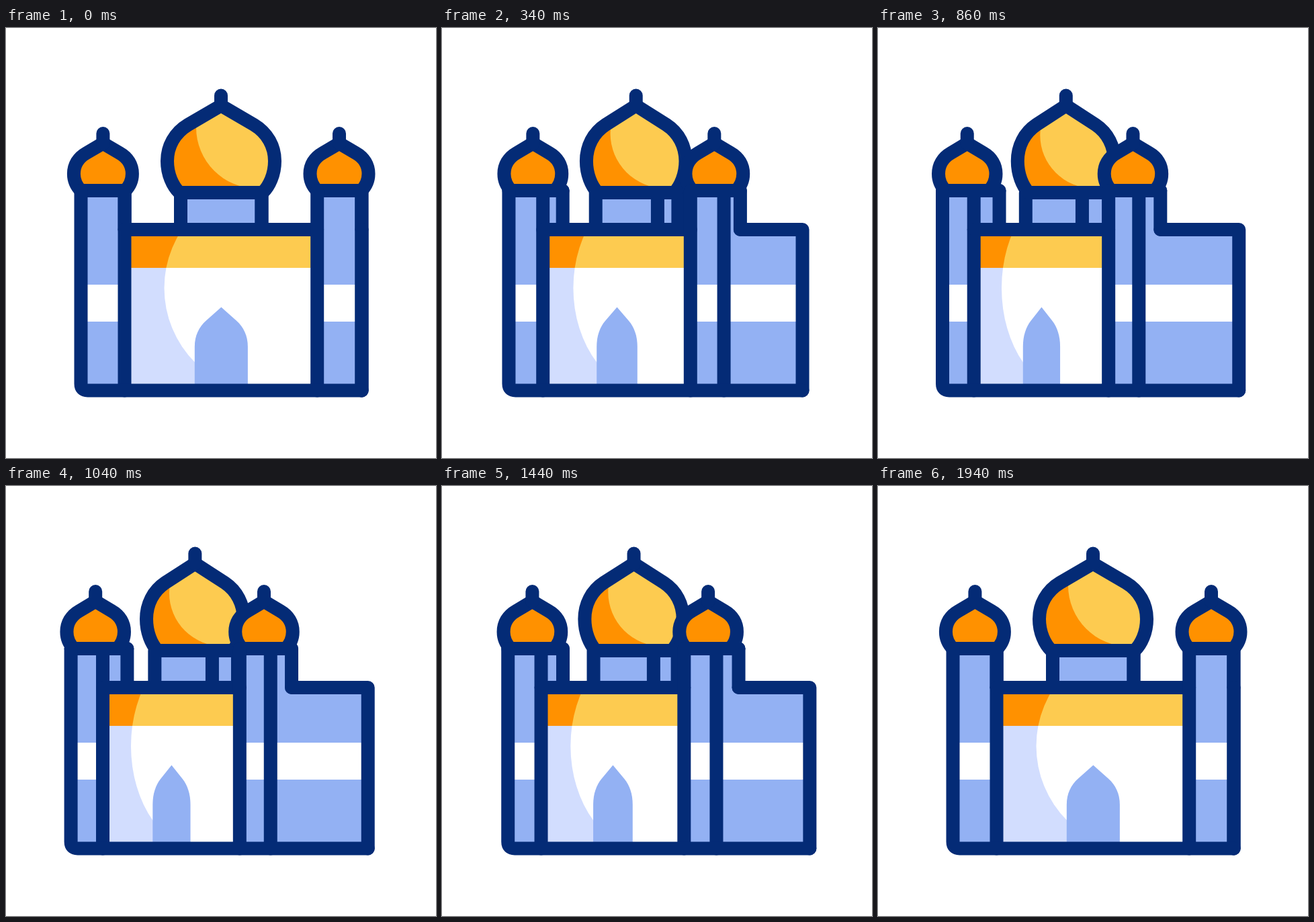
Recreate the animation shown at these times as an HTML page with a canvas. Size 640 px wide and 640 px high, loop 2.4 s.

```html
<!DOCTYPE html>
<html lang="en">
<head>
<meta charset="utf-8">
<title>Turning palace</title>
<style>
  html, body { margin: 0; width: 100%; height: 100%; overflow: hidden; background: #fff; }
  canvas { display: block; width: 640px; height: 640px; }
</style>
</head>
<body>
<canvas id="stage" width="640" height="640"></canvas>
<script>
const g = document.getElementById('stage').getContext('2d');
const NAVY = '#042b76', ORANGE = '#ff9100', YELLOW = '#fdcb50',
      BLUE = '#93b1f3', PALE = '#d2ddfe', WHITE = '#fff';
const LOOP = 2400, STEP = 20, BASE = 539.5, ROOF = 300;

const smooth = x => (1 - Math.cos(Math.PI * x)) / 2;
const linear = x => x;

// Rows: time, value, easing used to reach it
const TURN = [[0, 0], [524, -125, smooth], [1370, -103.7, linear], [1940, 0, smooth]];
const REAR = [[0, 0], [524, -118, smooth], [1400, -95, linear], [1940, 0, linear]];
const DEPTH = [[0, 0], [510, 130, smooth], [1220, 118, linear], [1460, 117.5, linear], [1777, 0, smooth]];

function at(track, t) {
  for (let i = 1; i < track.length; i++) {
    const [t0, v0] = track[i - 1], [t1, v1, ease] = track[i];
    if (t <= t1) return v0 + (v1 - v0) * ease((t - t0) / (t1 - t0));
  }
  return track[track.length - 1][1];
}

function rect(x0, y0, x1, y1, color) {
  g.fillStyle = color;
  g.fillRect(x0, y0, x1 - x0, y1 - y0);
}

function disc(x, y, r, color) {
  g.fillStyle = color;
  g.beginPath();
  g.arc(x, y, r, 0, Math.PI * 2);
  g.fill();
}

function line(...pts) {
  g.beginPath();
  for (let i = 0; i < pts.length; i += 2) g.lineTo(pts[i], pts[i + 1]);
  g.stroke();
}

function stripes(x0, x1, top) {
  rect(x0, top, x1, BASE, BLUE);
  rect(x0, 382, x1, 437, WHITE);
}

// Onion outline: points of the left half, mirrored for the right
function onion(cx, top, [a, b, c, d, e, f, h], sx) {
  const p = new Path2D();
  const X = (q, side) => cx + side * q[0] * sx;
  p.moveTo(cx, top);
  p.lineTo(X(a, -1), a[1]);
  p.bezierCurveTo(X(b, -1), b[1], X(c, -1), c[1], X(d, -1), d[1]);
  p.bezierCurveTo(X(e, -1), e[1], X(f, -1), f[1], X(h, -1), h[1]);
  p.lineTo(X(h, 1), h[1]);
  p.bezierCurveTo(X(f, 1), f[1], X(e, 1), e[1], X(d, 1), d[1]);
  p.bezierCurveTo(X(c, 1), c[1], X(b, 1), b[1], X(a, 1), a[1]);
  p.closePath();
  return p;
}

const BIG = [[49, 144], [69, 156], [80, 176], [80, 198], [80, 218], [72, 235], [62, 245]];
const SMALL = [[24.5, 186], [37, 193], [43.5, 204], [43.5, 217], [43.5, 228], [39, 236], [33, 242]];

function mainDome(d, rear) {
  const cx = 320 + 0.345 * d, p = -d / 117;
  const left = cx - 60, edge = cx + 60.5 + 0.312 * d, right = 380.5 + 0.34 * rear;
  rect(left, 245, right, ROOF, BLUE);
  line(left, ROOF, left, 245, right, 245, right, ROOF);
  line(edge, 245, edge, ROOF);

  const shape = onion(cx, 115.4, BIG, 1 + 0.000855 * d);
  g.save();
  g.clip(shape);
  rect(cx - 90, 100, cx + 90, 250, ORANGE);
  disc(cx + 54 - 13.5 * p, 148 + 11.5 * p, 91 - 12 * p, YELLOW);
  g.restore();
  g.stroke(shape);
  line(cx, 100.5, cx, 116);
}

function tower({ cx, left, mid, right }, sx) {
  rect(left, 242, right, ROOF, BLUE);
  stripes(left, mid, 242);
  line(right, 242, right, ROOF);
  line(mid, 242, mid, BASE);
  line(left, 242, right, 242);
  const shape = onion(cx, 171.6, SMALL, sx);
  g.fillStyle = ORANGE;
  g.fill(shape);
  g.stroke(shape);
  line(cx, 157, cx, 172);
}

function facade(left, right) {
  const s = (right - left) / 286.5;
  g.save();
  g.translate(left, 0);
  g.scale(s, 1);
  g.translate(-176.5, 0);
  g.beginPath();
  g.rect(176.5, ROOF, 286.5, BASE - ROOF);
  g.clip();
  rect(176, ROOF, 464, BASE, PALE);
  disc(392.5, 387, 157, WHITE);
  g.beginPath();
  g.rect(176, ROOF, 288, 57);
  g.clip();
  rect(176, ROOF, 464, 357, ORANGE);
  disc(392.5, 387, 157, YELLOW);
  g.restore();

  g.save();
  g.translate((left + right) / 2 + 0.5, 0);
  g.scale(s, 1);
  g.fillStyle = BLUE;
  g.beginPath();
  g.moveTo(-39.5, BASE);
  g.lineTo(-39.5, 474);
  g.bezierCurveTo(-39.5, 458, -33, 445, -23, 436);
  g.lineTo(0, 415.5);
  g.lineTo(23, 436);
  g.bezierCurveTo(33, 445, 39.5, 458, 39.5, 474);
  g.lineTo(39.5, BASE);
  g.fill();
  g.restore();
}

function draw(t) {
  const d = at(TURN, t), rear = at(REAR, t);
  const side = 529.7 + d + at(DEPTH, t);
  const l = { cx: 144.4 + 0.1 * d, left: 111.5 + 0.133 * d, mid: 176.5 + 0.29 * d, right: 176.7 - 0.033 * d };
  const r = { cx: 496 + d, left: 463.2 + 1.03 * d, mid: 529.3 + 1.21 * d, right: 529.5 + rear };
  const squeeze = 1 + 0.00015 * d;

  rect(0, 0, 640, 640, WHITE);
  g.strokeStyle = NAVY;
  g.lineWidth = 20;
  g.lineCap = g.lineJoin = 'round';

  mainDome(d, rear);
  facade(l.mid, r.left);
  stripes(r.mid, side, ROOF);
  tower(l, squeeze);
  tower(r, squeeze);

  line(l.mid, ROOF, r.left, ROOF);
  line(r.left, 242, r.left, BASE);
  line(Math.min(r.right, side), ROOF, side, ROOF, side, BASE);

  g.beginPath();
  g.moveTo(l.left, 242);
  g.lineTo(l.left, BASE - 10);
  g.quadraticCurveTo(l.left, BASE, l.left + 10, BASE);
  g.lineTo(side, BASE);
  g.stroke();
}

const start = performance.now();
function tick() {
  const t = (performance.now() - start) % LOOP;
  draw(Math.floor(t / STEP) * STEP);
  requestAnimationFrame(tick);
}
tick();
</script>
</body>
</html>
```
